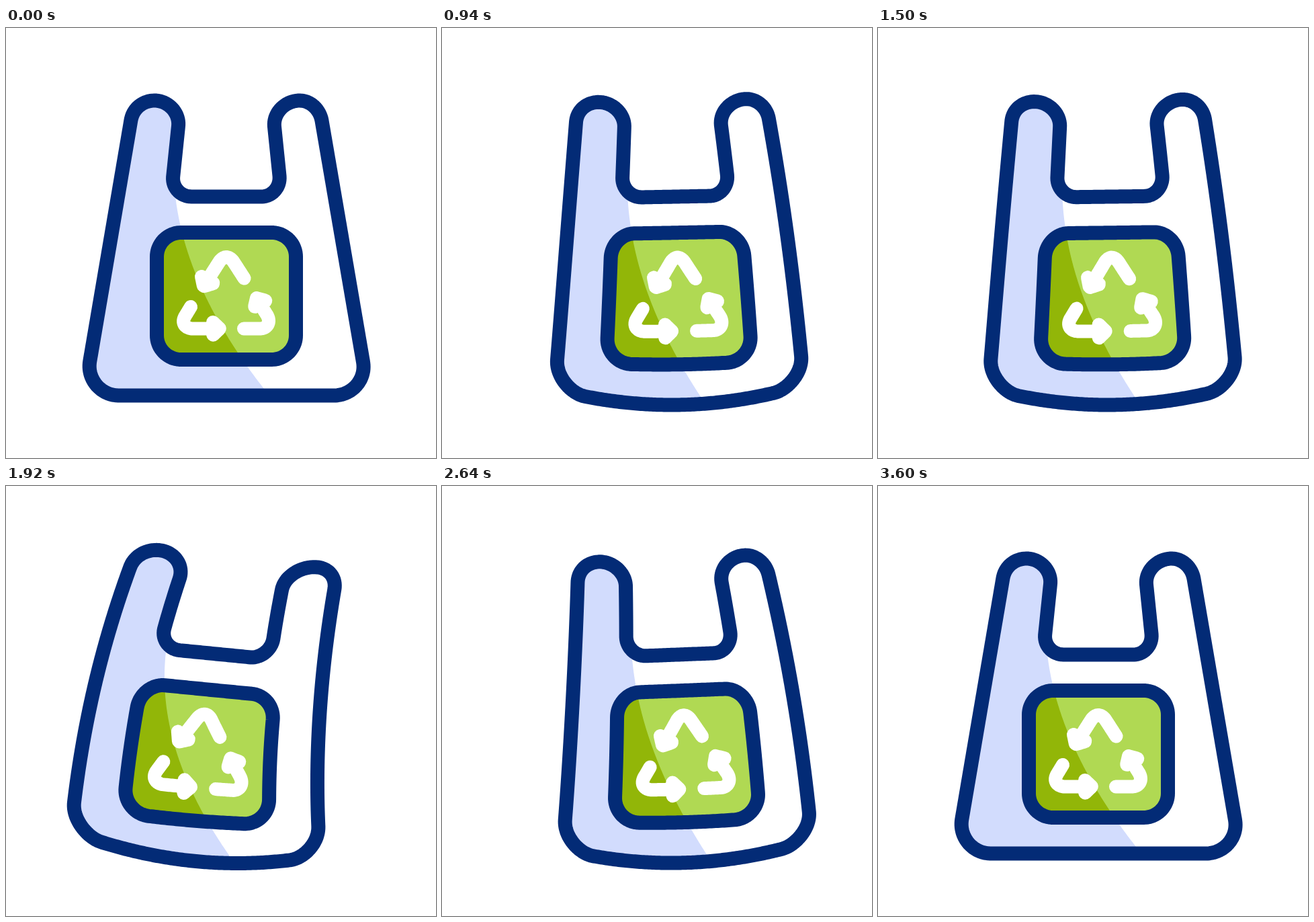
Write an HTML page with a canvas that moves like this. It is 640 px wide and 640 px high and loops after 3.62 s.

```html
<!DOCTYPE html>
<html lang="en">
<head>
<meta charset="utf-8">
<title>Swaying bag</title>
<style>
html, body { margin: 0; width: 100%; height: 100%; overflow: hidden; background: #fff; }
canvas { display: block; width: 640px; height: 640px; }
</style>
</head>
<body>
<canvas id="stage"></canvas>
<script>
const LOOP = 3620, BEAT = 601, BEATS = 6;
const SWING = 102, DECAY = 0.84;
const CENTER = 328, BASE = 547, HEIGHT = 439;
const NAVY = '#032b76', LILAC = '#d2dcfd', LIME = '#b0d953', OLIVE = '#92b608';

const canvas = document.getElementById('stage');
const ctx = canvas.getContext('2d');
const ratio = window.devicePixelRatio || 1;
canvas.width = canvas.height = 640 * ratio;
ctx.scale(ratio, ratio);
ctx.lineCap = ctx.lineJoin = 'round';

// Even points along an SVG path, so that a warp can bend straight edges
function sample(d, gap = 3) {
  const path = document.createElementNS('http://www.w3.org/2000/svg', 'path');
  path.setAttribute('d', d);
  const length = path.getTotalLength(), count = Math.ceil(length / gap);
  return Array.from({ length: count + 1 }, (_, i) => {
    const { x, y } = path.getPointAtLength(length * i / count);
    return [x, y];
  });
}

const bag = sample(`M124.8 496L186 137C189 120 203.5 108 221 108C241.5 108 258.5 126 256.5 146
  L248.7 221C247 237.5 260 251 276 251H380C396 251 408.7 237 407 220
  L399.5 147C397.3 126 416 108 437 108C453 108 467 121 470 138
  L531.5 497C536 523.5 515 547 488 547H168C141 547 120.3 522.6 124.8 496Z`);
const panel = sample(`M260.5 304.5H395.5A36 36 0 0 1 431.5 340.5V457.5A36 36 0 0 1 395.5 493.5
  H260.5A36 36 0 0 1 224.5 457.5V340.5A36 36 0 0 1 260.5 304.5Z`);
const shadeEdge = sample('M251 240C261 353 321 459 392 547');
const arrows = [
  'M354.5 372.5L338 347Q328 335 318 347L303 370.5',
  'M291 370L309 380L294 384.5Z',
  'M275 415L266.5 429C260 440 268 447.5 278 447.5H308',
  'M308 438L318 447.5L308 457Z',
  'M354 447.5H378C389 447.5 395 437.5 388 426.5L378 410.5',
  'M373 402L387 406L370 415Z'
].map(d => sample(d, 2));

// Width change at the base, and how it grows towards the top
const BAG_PINCH = [-25, 31], PANEL_PINCH = [16, -50];

// sway shifts the base sideways; loose is 0 at rest and 1 while swinging
function warp([x, y], { sway, loose }, [foot, rise]) {
  const q = (BASE - y) / HEIGHT, d = x - CENTER;
  const follow = 1 - 1.05 * q * q;
  const pinch = loose * (foot + rise * q) - 0.2 * sway * q * q;
  const bulge = loose * (14 - 15 * (d / 160) ** 2) * (1 - q) ** 5;
  const tilt = 0.0014 * sway * (1 + 0.4 * q * q);
  return [
    x + 14 * loose + sway * follow + pinch * d / 200,
    y - tilt * d - 0.0007 * sway * sway * follow + bulge
  ];
}

// Peaks alternate and fade; the first and last beats are at rest
function peak(n) {
  const moving = n > 0 && n < BEATS;
  return { sway: moving ? -SWING * (-DECAY) ** (n - 1) : 0, loose: moving ? 1 : 0 };
}

function stateAt(t) {
  const beat = Math.min(t / BEAT, BEATS), n = Math.floor(beat);
  const k = (1 - Math.cos(Math.PI * (beat - n))) / 2;
  const a = peak(n), b = peak(n + 1);
  return { sway: a.sway + (b.sway - a.sway) * k, loose: a.loose + (b.loose - a.loose) * k };
}

function trace(points, state, pinch) {
  const path = new Path2D();
  points.forEach(p => path.lineTo(...warp(p, state, pinch)));
  return path;
}

// The light stays behind a little as the bag moves
function shadeArea(state) {
  const lag = 25 * state.loose + 0.25 * state.sway;
  const edge = shadeEdge.map(([x, y]) => [x - lag * (1 - (BASE - y) / HEIGHT) ** 2, y]);
  const area = trace(edge, state, PANEL_PINCH);
  area.lineTo(0, 700);
  area.lineTo(0, 0);
  area.lineTo(330, 0);
  area.closePath();
  return area;
}

function drawShape(outline, shade, light, dark) {
  outline.closePath();
  ctx.fillStyle = light;
  ctx.fill(outline);
  ctx.save();
  ctx.clip(outline);
  ctx.fillStyle = dark;
  ctx.fill(shade);
  ctx.restore();
  ctx.strokeStyle = NAVY;
  ctx.lineWidth = 21;
  ctx.stroke(outline);
}

function draw(t) {
  const state = stateAt(t), shade = shadeArea(state);
  ctx.fillStyle = '#fff';
  ctx.fillRect(0, 0, 640, 640);
  drawShape(trace(bag, state, BAG_PINCH), shade, '#fff', LILAC);
  drawShape(trace(panel, state, PANEL_PINCH), shade, LIME, OLIVE);
  ctx.strokeStyle = '#fff';
  ctx.lineWidth = 20;
  arrows.forEach(arrow => ctx.stroke(trace(arrow, state, PANEL_PINCH)));
}

const start = performance.now();
function tick() {
  draw((performance.now() - start) % LOOP);
  requestAnimationFrame(tick);
}
tick();
</script>
</body>
</html>
```
